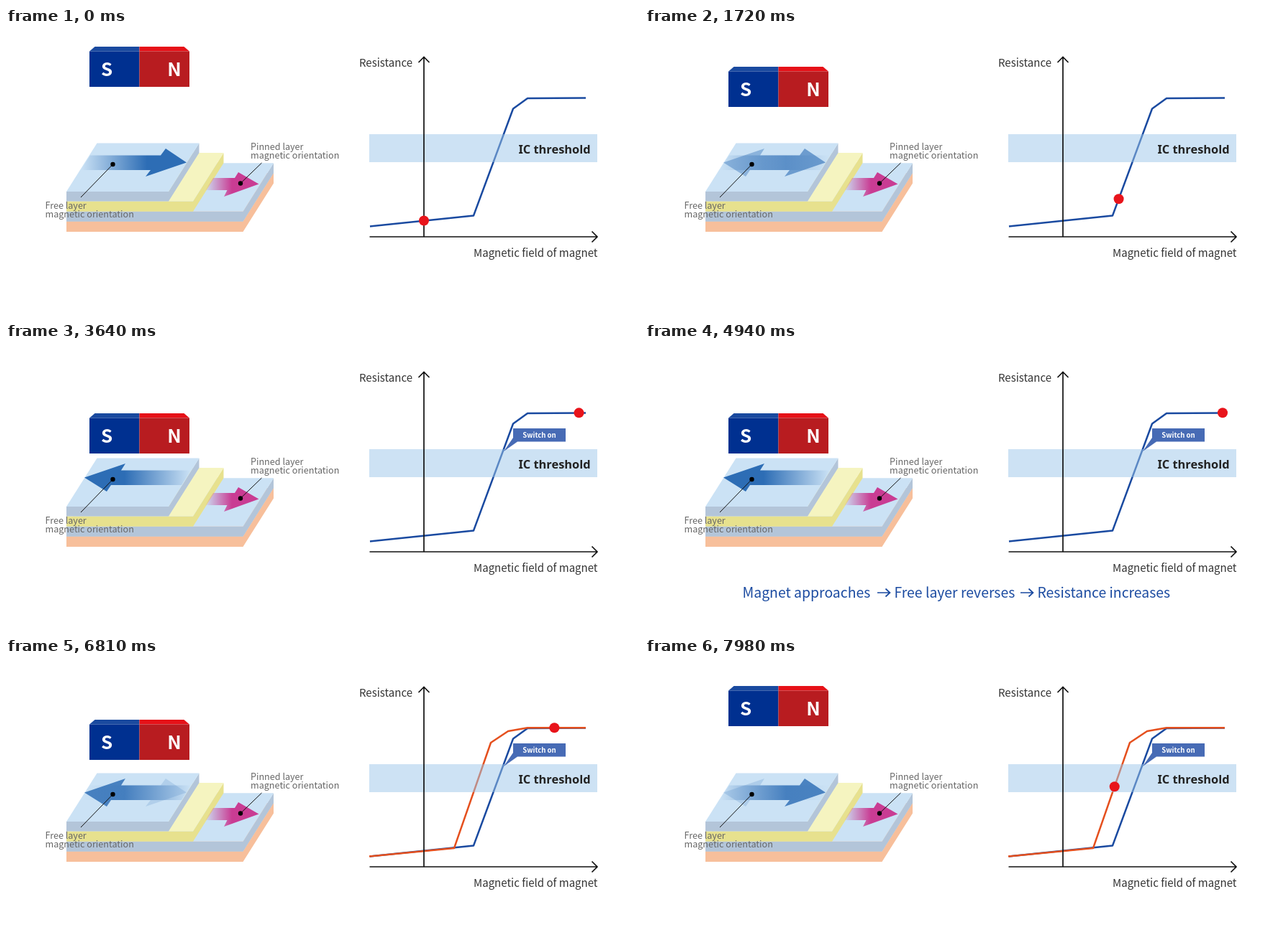
An HTML page that plays this animation: 880x400 px, repeating every 8000 ms.

```html
<!DOCTYPE html>
<html lang="en">
<head>
<meta charset="utf-8">
<title>Magnet and resistance</title>
<style>
html, body { margin: 0; width: 100%; height: 100%; overflow: hidden; background: #fff; }
svg { display: block; }
text { font-family: "Noto Sans CJK JP", "Noto Sans CJK SC", "Noto Sans CJK", "Open Sans", sans-serif; }
.axis { font-size: 15px; font-weight: 500; fill: #333; }
.note { font-size: 12.6px; fill: #666; }
.pole { font-size: 26px; font-weight: 700; fill: #fff; text-anchor: middle; }
.say { font-size: 19.4px; fill: #1a4aa0; }
.say path { fill: none; stroke: #1a4aa0; stroke-width: 1.7; }
.line { fill: none; stroke-width: 2.5; stroke-linejoin: round; }
.thin { fill: none; stroke: #111; }
</style>
</head>
<body>
<svg width="880" height="400" viewBox="0 0 880 400">
  <defs>
    <linearGradient id="toRight" gradientUnits="userSpaceOnUse" x1="104" x2="196">
      <stop stop-color="#2d6db5" stop-opacity="0"/><stop offset="1" stop-color="#2d6db5"/>
    </linearGradient>
    <linearGradient id="toLeft" gradientUnits="userSpaceOnUse" x1="257" x2="165">
      <stop stop-color="#2d6db5" stop-opacity="0"/><stop offset="1" stop-color="#2d6db5"/>
    </linearGradient>
    <linearGradient id="pink" gradientUnits="userSpaceOnUse" x1="276" x2="314">
      <stop stop-color="#c93c93" stop-opacity="0"/><stop offset="1" stop-color="#c93c93"/>
    </linearGradient>
  </defs>

  <g id="slabs"></g>
  <path id="right" fill="url(#toRight)" d="M117 177.5H215L222 168L251 187.5L194 207L201 198H104Z"/>
  <path id="left" fill="url(#toLeft)" d="M257 177.5H160L166 168L109 187.5L140 207L146 198H244Z"/>
  <path fill="url(#pink)" d="M288 209H318L323 201L351.5 217.5L303 235L307.5 226H277Z"/>
  <path class="thin" d="M148.5 190L104 236M326 216.5L355.5 188"/>
  <circle cx="148.5" cy="190" r="3.2"/><circle cx="326" cy="216.5" r="3.2"/>
  <g class="note">
    <text x="340" y="169.5">Pinned layer</text>
    <text x="340" y="182">magnetic orientation</text>
    <text x="54.5" y="252">Free layer</text>
    <text x="54.5" y="264">magnetic orientation</text>
  </g>

  <g id="magnet">
    <path fill="#1a4a9f" d="M116 32.5L123.5 26H185.5V32.5Z"/>
    <path fill="#e61118" d="M185.5 26H247.5L255 32.5H185.5Z"/>
    <path fill="#003090" d="M116 32.5H185.5V82H116Z"/>
    <path fill="#b81c20" d="M185.5 32.5H255V82H185.5Z"/>
    <text class="pole" x="140" y="67">S</text>
    <text class="pole" x="234" y="67">N</text>
  </g>

  <path class="line" stroke="#1a4aa0" d="M506 276.5L650 261.5L705 112.5L725 98L806 97.5"/>
  <path class="line" stroke="#e5501e" id="back" d="M505 276.5L623 265L674 118L698 102L725 97.3H806"/>
  <path fill="#9bc6ea" fill-opacity=".5" d="M505 148H822V187H505Z"/>
  <path class="thin" stroke-width="1.7" d="M581 291V41M573.5 48L581 40.5L588.5 48M505.5 291H822M814.5 283.5L822 291L814.5 298.5"/>
  <text x="762.5" y="175" text-anchor="middle" style="font:600 16.4px 'Noto Sans',sans-serif" fill="#222">IC threshold</text>
  <text class="axis" x="491" y="54">Resistance</text>
  <text class="axis" x="822.5" y="319" text-anchor="end">Magnetic field of magnet</text>
  <g id="bubble">
    <path fill="#476bb5" d="M705 119H778V137.5H711L692 151L705 132Z"/>
    <text x="741.5" y="132" text-anchor="middle" font-size="9.6" font-weight="700" fill="#fff">Switch on</text>
  </g>
  <circle id="dot" r="7" fill="#e8141b"/>

  <g class="say" id="say1"><text x="135.5" y="355">Magnet approaches</text></g>
  <g class="say" id="say2"><path d="M323 348H340M334.5 342.5L340.5 348L334.5 353.5"/><text x="346.5" y="355">Free layer reverses</text></g>
  <g class="say" id="say3"><path d="M522 348H539M533.5 342.5L539.5 348L533.5 353.5"/><text x="545.5" y="355">Resistance increases</text></g>
</svg>
<script>
const $ = id => document.getElementById(id);

// Each slab: right end of the front, top of the front, height, top colour, side colour
$('slabs').innerHTML = [
  [329.5, 269.5, 14.5, '#f7bf9b', '#f7bf9b'],
  [329.5, 255.7, 14, '#cbe2f5', '#b3c5d9'],
  [260, 241.5, 14.2, '#f5f4c0', '#e7e18e'],
  [226, 228, 13.5, '#cbe2f5', '#b3c5d9']
].map(([x, y, h, top, side]) =>
  `<path fill="${side}" d="M84 ${y}H${x}l42.5 -67.5v${h}l-42.5 67.5H84Z"/>
   <path fill="${top}" d="M84 ${y}H${x}l42.5 -67.5H126.5Z"/>`).join('');

// Dot positions as [step, x, y]
const rise = [[0, 581, 268.5], [19, 650, 261.5], [51, 705, 112.5], [66, 725, 98], [90, 803, 97.3]];
const fall = [[0, 803, 97.3], [19.2, 725, 97.3], [26, 698, 102], [33, 674, 118], [71.4, 623, 265], [81.8, 581, 268.5]];

function along(path, k) {
  const i = path.findIndex(p => p[0] > k);
  if (i < 0) return path[path.length - 1].slice(1);
  const [a, x, y] = path[i - 1], [b, u, v] = path[i], f = (k - a) / (b - a);
  return [x + (u - x) * f, y + (v - y) * f];
}

function draw() {
  const t = performance.now() % 8000;
  const steps = start => Math.max(0, Math.floor((t - start) / 30) + 1);
  const part = (start, n) => Math.min(1, steps(start) / n);
  const fade = (id, a) => $(id).setAttribute('opacity', a);

  const near = part(1030, 60) - part(6540, 60);
  $('magnet').setAttribute('transform', `translate(0 ${Math.floor(72 * near + 1e-6)})`);
  fade('right', 1 - near);
  fade('left', near);
  fade('bubble', part(2290, 10));
  fade('back', part(5640, 30));

  const gone = part(6540, 10);
  [3730, 4030, 4670].forEach((s, i) => fade('say' + (i + 1), part(s, 10) * (1 - gone)));

  const [x, y] = t < 6540 ? along(rise, steps(1030)) : along(fall, steps(6540));
  $('dot').setAttribute('cx', x);
  $('dot').setAttribute('cy', y);
  requestAnimationFrame(draw);
}
draw();
</script>
</body>
</html>
```
